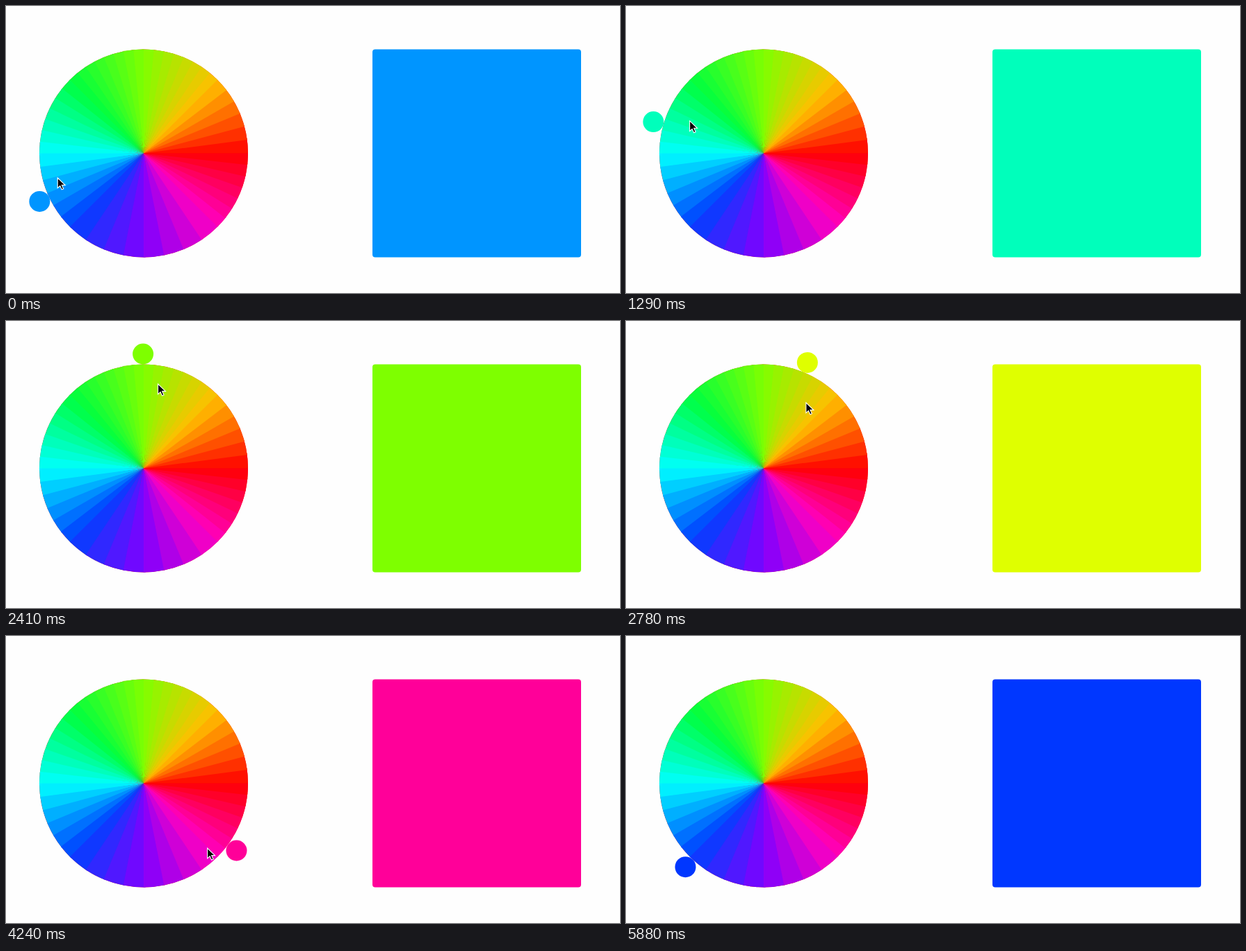
Write an HTML page that moves like this. It is 883x414 px and loops after 6720 ms.

```html
<!DOCTYPE html>
<html lang="en">
<head>
<meta charset="utf-8">
<title>Colour wheel</title>
<style>
  html, body { margin: 0; width: 100%; height: 100%; overflow: hidden; background: #fefefe; }
  svg { display: block; width: 883px; height: 414px; }
</style>
</head>
<body>
<svg viewBox="0 0 883 414">
  <circle cx="198" cy="212.5" r="150" fill="red"/>
  <g id="wheel"></g>
  <circle id="knob" r="15"/>
  <rect id="swatch" x="527" y="62.5" width="300" height="300" rx="4"/>
  <path id="cursor" d="M.5 .8V15.6L4 12.4 6.5 17.8 9 16.7 6.6 11.4H11.4Z" fill="#000" stroke="#fff" stroke-width="1.1"/>
</svg>
<script>
const LOOP = 6720, STEP = 130, CX = 198, CY = 212.5, R = 150, ORBIT = 165;
const [wheel, knob, swatch, cursor] = ['wheel', 'knob', 'swatch', 'cursor']
  .map(id => document.getElementById(id));

const mix = (a, b, f) => a.map((v, i) => v + (b[i] - v) * f);
const css = rgb => `rgb(${rgb.map(Math.round)})`;
const set = (el, attrs) => {
  for (const name in attrs) el.setAttribute(name, attrs[name]);
};

function polar(deg, r) {
  const a = deg * Math.PI / 180;
  return [CX + r * Math.cos(a), CY - r * Math.sin(a)];
}

// Pure hue as an RGB triple
const hueRgb = h => [0, 8, 4].map(n => {
  const k = (n + h / 30 + 24) % 12;
  return 255 * (0.5 - 0.5 * Math.max(-1, Math.min(k - 3, 9 - k, 1)));
});

// Eight sectors of 45 degrees, each blended in its own number of flat bands
const SECTOR = 45, bands = [6, 8, 8, 7, 6, 4, 4, 7];
wheel.innerHTML = bands.map((n, s) => {
  const from = hueRgb(s * SECTOR), to = hueRgb((s + 1) * SECTOR);
  return Array.from({ length: n }, (_, i) => {
    const start = (s + i / n) * SECTOR;
    const end = Math.min(start + SECTOR / n + 1, 360); // overlap hides seams
    return `<path fill="${css(mix(from, to, (i + 0.5) / n))}"
      d="M${CX} ${CY}L${polar(start, R)}A${R} ${R} 0 0 0 ${polar(end, R)}Z"/>`;
  }).join('');
}).join('');

// time, knob hue, pointer lead in degrees, pointer distance from the centre
const keys = [
  [0, 204.9, 9.4, 129],
  [850, 186, 9, 120],
  [1290, 164, 8, 117],
  [1850, 120.6, 9.2, 139],
  [2780, 67.6, 9.9, 113],
  [3600, 4.7, 5.6, 125.4],
  [4240, -36, 9.5, 130],
  [4500, -71, 10, 132],
  [4940, -98.4, 12.6, 135],
  [5320, -121, 10, 135],
  [5880, -133, 12, 140]
];
const END = keys[keys.length - 1][0];

// The drag advances in even jumps of about STEP between keys
function pose(t) {
  if (t >= END) return keys[keys.length - 1];
  const i = keys.findIndex(k => k[0] > t);
  const a = keys[i - 1], b = keys[i], span = b[0] - a[0];
  const n = Math.round(span / STEP);
  return mix(a, b, Math.floor((t - a[0]) / span * n) / n);
}

function draw(t) {
  const [, hue, lead, reach] = pose(t);
  const fill = css(hueRgb(hue));
  const [cx, cy] = polar(hue, ORBIT);
  set(knob, { cx, cy, fill });
  set(swatch, { fill });
  set(cursor, {
    transform: `translate(${polar(hue - lead, reach)})`,
    visibility: t < END ? 'visible' : 'hidden'
  });
}

const start = performance.now();
function loop() {
  draw((performance.now() - start) % LOOP);
  requestAnimationFrame(loop);
}
loop();
</script>
</body>
</html>
```
